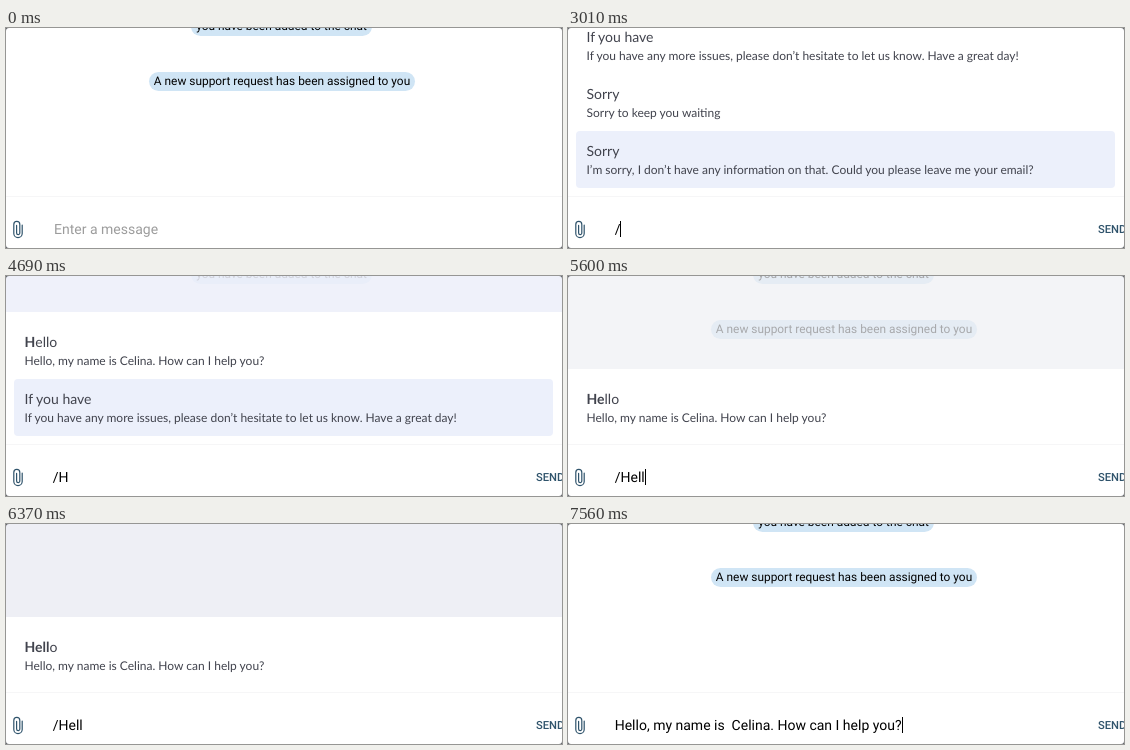
Recreate the animation shown at these times as an HTML page with a canvas. Size 556 by 220 pixels, loop 8 s.

```html
<!DOCTYPE html>
<html lang="en">
<head>
<meta charset="utf-8">
<title>Saved replies in chat</title>
<style>
  html, body { margin: 0; width: 100%; height: 100%; overflow: hidden; background: #fff; }
  canvas { display: block; width: 556px; height: 220px; }
</style>
</head>
<body>
<canvas id="stage"></canvas>
<script>
const W = 556, H = 220, LOOP = 8000, STEP = 70;
const ROW = 57, LIST_END = 160, LIST_PAD = 10, FIELD_X = 46.7;

const canvas = document.getElementById('stage');
const ctx = canvas.getContext('2d');
const dpr = window.devicePixelRatio || 1;
canvas.width = W * dpr;
canvas.height = H * dpr;
ctx.scale(dpr, dpr);
ctx.textRendering = 'geometricPrecision';

const HELLO = { title: 'Hello', text: 'Hello, my name is Celina. How can I help you?' };
const BYE = { title: 'If you have', text: 'If you have any more issues, please don’t hesitate to let us know. Have a great day!' };
const WAIT = { title: 'Sorry', text: 'Sorry to keep you waiting' };
const NO_INFO = { title: 'Sorry', text: 'I’m sorry, I don’t have any information on that. Could you please leave me your email?' };

// Field contents from each time on
const typed = [
  [0, ''], [910, '/'], [3220, '/H'], [4900, '/He'], [5250, '/Hel'], [5530, '/Hell'],
  [7350, 'Hello, my name is  Celina. How can I help you?']
];

// Reply list: start, rows, matched letters, start and end of the highlight fade
const lists = [
  [0, null],
  [1750, [HELLO, BYE, WAIT, NO_INFO], 0, 1890, 2240],
  [3570, [HELLO, BYE], 1, 3850, 4200],
  [5530, [HELLO], 2, 6370, 7000],
  [5880, [HELLO], 3, 6370, 7000],
  [6370, [HELLO], 4, 6370, 7000],
  [7350, null]
];

const caretFlips = [70, 700, 910, 1470, 1960, 2520, 3010, 3710, 4200, 4690, 4900, 6060, 6550, 7050, 7560];

const latest = (steps, t) => steps.filter(s => s[0] <= t).pop();
const ramp = (t, a, b) => Math.min(1, Math.max(0, (t - a) / (b - a)));
const mix = (a, b, k) => `rgb(${a.map((v, i) => Math.round(v + (b[i] - v) * k))})`;

function write(str, x, y, font, color, align = 'left') {
  ctx.font = font;
  ctx.fillStyle = color;
  ctx.textAlign = align;
  ctx.fillText(str, x, y);
  return ctx.measureText(str).width;
}

function box(x, y, w, h, r, color) {
  ctx.fillStyle = color;
  ctx.beginPath();
  ctx.roundRect(x, y, w, h, r);
  ctx.fill();
}

function faded(alpha, draw) {
  ctx.globalAlpha = alpha;
  draw();
  ctx.globalAlpha = 1;
}

function drawNotice(str, x, y, w) {
  box(x, y, w, 19, 9.5, '#d0e5f5');
  write(str, x + w / 2, y + 13.2, '11.9px Roboto, sans-serif', '#000', 'center');
}

function drawChat() {
  drawNotice('you have been added to the chat', 185, -11, 181);
  drawNotice('A new support request has been assigned to you', 143, 44, 266);
}

function drawBackdrop(t, height) {
  const early = t < 5530;
  const alpha = early ? 0.88 * ramp(t, 3500, 3990) : 0.4 + 0.6 * ramp(t, 5460, 5740);
  const cool = [237, 240, 250], grey = [238, 239, 244];
  faded(alpha, () => {
    ctx.fillStyle = early ? `rgb(${cool})` : mix(grey, cool, ramp(t, 6300, 7000));
    ctx.fillRect(0, 0, W, height);
  });
}

function drawRow({ title, text }, top, match) {
  const size = '14px Lato, sans-serif', color = '#41434d';
  let x = 18.5;
  if (match && title === HELLO.title) {
    x += write(title.slice(0, match), x, top + 25, 'bold ' + size, color);
    title = title.slice(match);
  }
  write(title, x, top + 25, size, color);
  write(text, 18.5, top + 43, '12px Lato, sans-serif', color);
}

function drawList(t) {
  const [, rows, match, fadeIn, fadeOut] = latest(lists, t);
  if (!rows) return;
  const first = LIST_END - rows.length * ROW;
  const top = Math.max(0, first - LIST_PAD);
  drawBackdrop(t, top);
  ctx.fillStyle = '#fff';
  ctx.fillRect(0, top, W, H - top);
  faded(ramp(t, fadeIn, fadeOut), () => box(8, LIST_END - ROW, 539, ROW, 4, '#ecf0fb'));
  rows.forEach((row, i) => drawRow(row, first + i * ROW, match));
}

function drawField(t) {
  const font = '14px Roboto, sans-serif';
  ctx.fillStyle = '#f6f6f7';
  ctx.fillRect(0, 168, W, 1);

  ctx.strokeStyle = '#2f536b';
  ctx.lineWidth = 1.2;
  ctx.lineCap = 'round';
  ctx.stroke(new Path2D('M16.2 197V205.4a4.2 4.2 0 0 1-8.4 0V196.4a3 3 0 0 1 6 0V205a1.6 1.6 0 0 1-3.2 0V197.4'));

  const value = latest(typed, t)[1];
  let width = 0;
  if (value) {
    width = write(value, FIELD_X, 206, font, '#000');
    write('SEND', 530, 205, '500 11.2px Roboto, sans-serif', '#2f536b');
  } else {
    write('Enter a message', 48, 206, font, '#9c9c9c');
  }
  if (caretFlips.filter(f => f <= t).length % 2) {
    ctx.fillStyle = '#000';
    ctx.fillRect(Math.round(FIELD_X + width), 193, 1, 16);
  }
}

function drawCorners() {
  ctx.fillStyle = '#5c5f66';
  ctx.beginPath();
  ctx.rect(0, 0, W, H);
  ctx.roundRect(0, 0, W, H, 3);
  ctx.fill('evenodd');
}

function frame(now) {
  const t = Math.floor((now % LOOP) / STEP) * STEP;
  ctx.fillStyle = '#fff';
  ctx.fillRect(0, 0, W, H);
  drawChat();
  drawList(t);
  drawField(t);
  drawCorners();
  requestAnimationFrame(frame);
}
requestAnimationFrame(frame);
</script>
</body>
</html>
```
